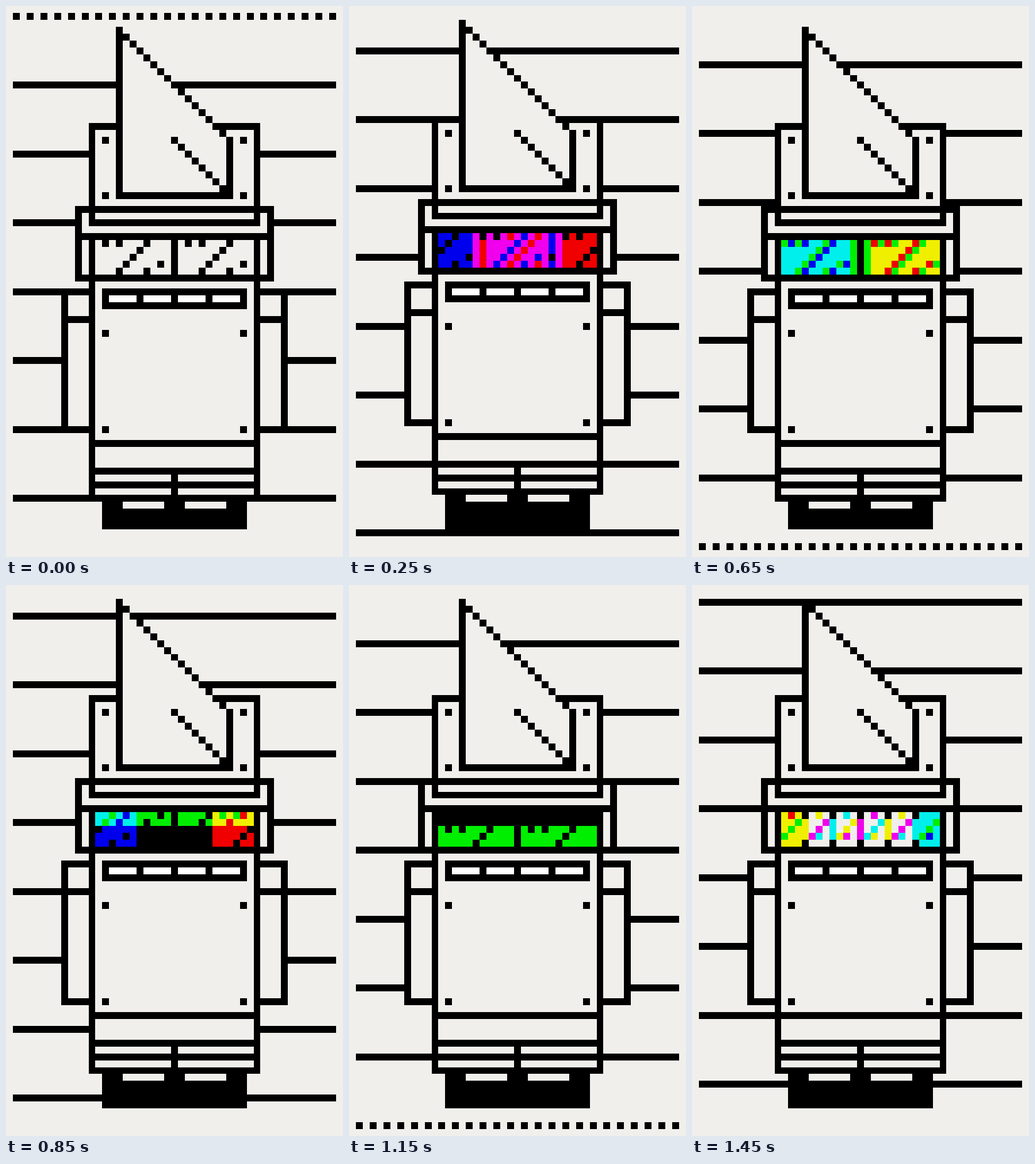
An HTML page with a canvas for the animation above (1500 ms loop, 586x956 px).

```html
<!DOCTYPE html>
<html>
<head>
<meta charset="utf-8">
<style>
  html, body { margin: 0; width: 100%; height: 100%; overflow: hidden; background: #f0efec; }
  canvas { display: block; }
</style>
</head>
<body>
<canvas width="586" height="956"></canvas>
<script>
const ctx = document.querySelector('canvas').getContext('2d');
const COLS = 49, ROWS = 80, STEPS = 30, STEP_MS = 50;
const INK = '#000', PAPER = '#f0efec', PAPER_RGB = [240, 239, 236];
const BOB = [0, 0, 1, 2, 2, 1];
let lift = 0;

const edgeX = c => Math.round(c * 586 / COLS);
const edgeY = r => Math.round(r * 956 / ROWS);

// All coordinates are grid cells; the robot's rows are raised by `lift`.
function px(c, r, w = 1, h = 1, color = INK) {
  const x = edgeX(c), y = edgeY(r - lift);
  ctx.fillStyle = color;
  ctx.fillRect(x, y, edgeX(c + w) - x, edgeY(r - lift + h) - y);
}

function box(c, r, w, h) {
  px(c, r, w, h);
  px(c + 1, r + 1, w - 2, h - 2, PAPER);
}

function drawLines(step) {
  for (let r = 1; r <= 78; r++) {
    if ((r + step) % 10 === 1) px(1, r, 47);
  }
}

// Thins the first and last rows to every other cell.
function thinEdges() {
  for (let c = 0; c < COLS; c += 2) {
    px(c, 1, 1, 1, PAPER);
    px(c, 78, 1, 1, PAPER);
  }
}

// Visor image: two panes with a slanted glint, dark outside.
function lit(c, r) {
  if (c < 13 || c > 35 || r < 0 || r > 4) return false;
  const k = (c - 12) % 12;
  if (k === 0 || k + r === 8) return false;
  return !(r === 0 && (k === 2 || k === 4) || r === 3 && k === 10 || r === 4 && k === 8);
}

// Red and blue slide apart sideways, then rush back in from the far sides.
const sideShift = step => step < 24 ? step : (step - 30) * 4;

// Green leaves at the top and eases back in from below, twice per loop.
function riseShift(step) {
  const left = Math.round(12 * (1 - step % 15 / 14) ** 2);
  return left > 6 ? left - 12 : left;
}

function drawVisor(step) {
  const dx = sideShift(step), dy = riseShift(step);
  px(12, 34, 25, 5);
  for (let r = 0; r < 5; r++) {
    for (let c = 13; c < 36; c++) {
      const on = [lit(c - dx, r), lit(c, r - dy), lit(c + dx, r)];
      const rgb = on.map((v, i) => v ? PAPER_RGB[i] : 0);
      px(c, 34 + r, 1, 1, `rgb(${rgb})`);
    }
  }
}

function drawBody() {
  box(8, 41, 5, 21);
  box(36, 41, 5, 21);
  px(8, 45, 33);

  px(14, 72, 21, 4 + lift);
  px(17, 72, 6, 1, PAPER);
  px(26, 72, 6, 1, PAPER);

  box(12, 39, 25, 33);
  for (const r of [63, 67, 69]) px(12, r, 25);
  px(24, 67, 1, 5);
  px(14, 41, 21, 3);
  for (const c of [15, 20, 25, 30]) px(c, 42, 4, 1, '#fff');
  for (const c of [14, 34]) {
    px(c, 47);
    px(c, 61);
  }
}

function drawHead() {
  box(12, 17, 25, 15);
  for (const c of [14, 34]) {
    px(c, 19);
    px(c, 27);
  }
  for (let i = 0; i < 15; i++) {
    px(17, 4 + i, i, 1, PAPER);
    px(17 + i, 4 + i);
    px(17 + i, 12 + i);
  }
  px(16, 3, 1, 25);
  px(32, 19, 1, 9);
  px(16, 27, 17);

  box(10, 29, 29, 11);
  px(12, 30);
  px(36, 30);
  px(12, 31, 25);
  px(10, 33, 29);
}

function draw(now) {
  const step = Math.floor(now / STEP_MS) % STEPS;
  lift = 0;
  px(0, 0, COLS, ROWS, PAPER);
  drawLines(step);
  lift = BOB[step % BOB.length];
  drawBody();
  drawHead();
  drawVisor(step);
  lift = 0;
  thinEdges();
}

const start = performance.now();
function tick() {
  draw(performance.now() - start);
  requestAnimationFrame(tick);
}
tick();
</script>
</body>
</html>
```
